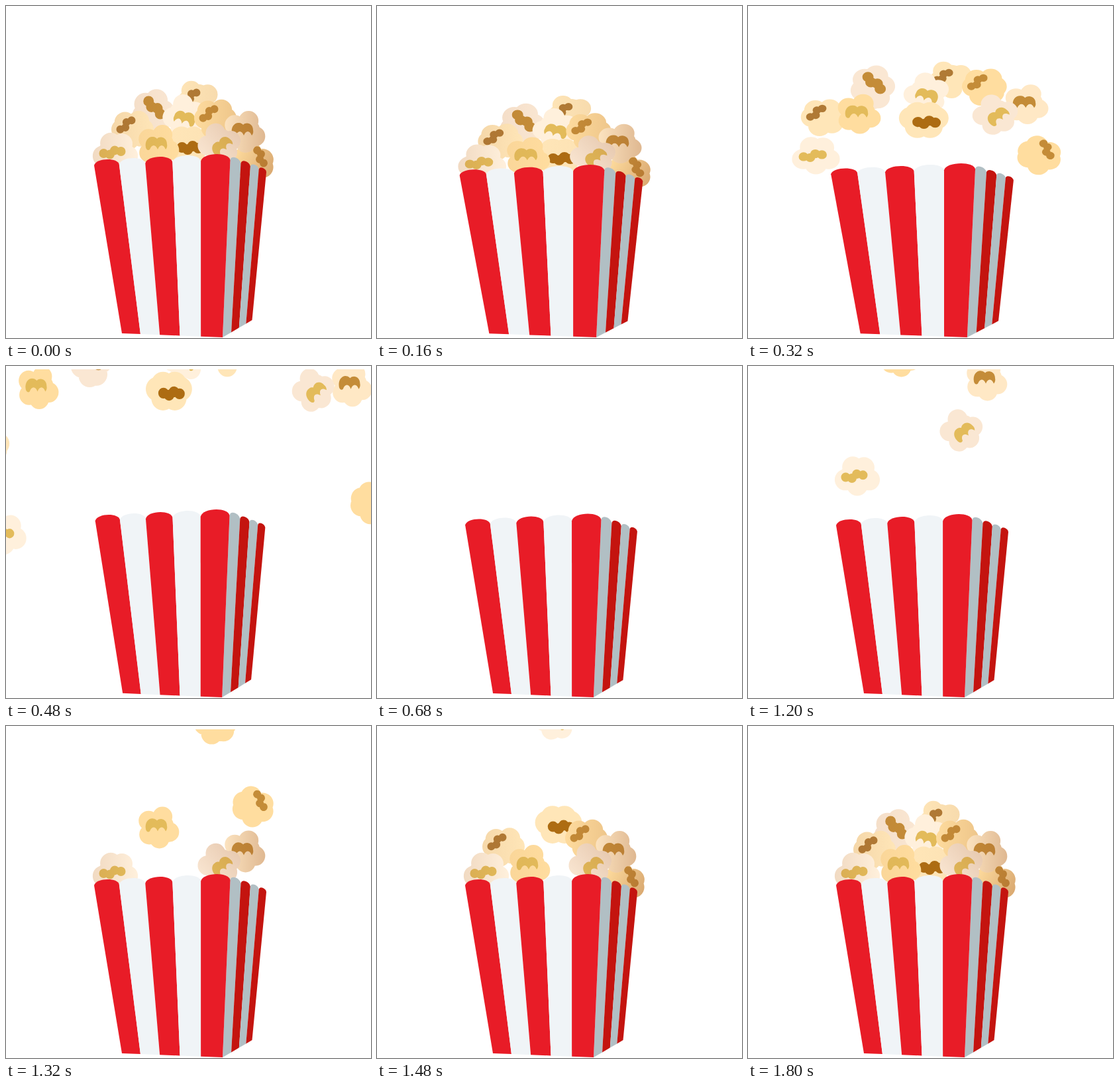
Animation, 551 px wide and 500 px high, one loop 1920 ms. Source, as an HTML page:

```html
<!DOCTYPE html>
<html lang="en">
<head>
<meta charset="utf-8">
<title>Popcorn</title>
<style>
  html, body { margin: 0; width: 100%; height: 100%; overflow: hidden; background: #fff; }
  svg { display: block; width: 100vw; height: 100vh; }
</style>
</head>
<body>
<svg viewBox="0 0 551 500">
  <defs>
    <clipPath id="sky"><rect y="5" width="551" height="495"/></clipPath>
    <linearGradient id="right" gradientUnits="userSpaceOnUse" x1="-30" x2="34">
      <stop offset="0" stop-color="#a0592a" stop-opacity=".1"/>
      <stop offset="1" stop-color="#a0592a"/>
    </linearGradient>
    <linearGradient id="left" gradientUnits="userSpaceOnUse" x1="34" x2="-34">
      <stop offset="0" stop-color="#a0592a" stop-opacity="0"/>
      <stop offset="1" stop-color="#a0592a"/>
    </linearGradient>
  </defs>
  <g clip-path="url(#sky)"><g id="scene"><g id="corn"></g><g id="tub"></g></g></g>
</svg>
<script>
const LOOP = 1920, STEP = 40;
const LAUNCH = 240, FLIGHT = 240, GONE = 680;
const FIRST_LANDING = 1239, BEAT = 40.7, FALL_SPEED = 1.4;
const MIDDLE = 268, HALF_WIDTH = 105;
const scene = document.getElementById('scene');
const corn = document.getElementById('corn');
const tub = document.getElementById('tub');

const lerp = (a, b, u) => a + (b - a) * u;
const smooth = u => u * u * (3 - 2 * u);
const radians = degrees => degrees * Math.PI / 180;

function add(parent, tag, attrs = {}) {
  const node = document.createElementNS('http://www.w3.org/2000/svg', tag);
  for (const key in attrs) node.setAttribute(key, attrs[key]);
  return parent.appendChild(node);
}

const ellipse = (x, y, rx, ry = rx) =>
  `M${x - rx},${y}a${rx},${ry} 0 1 1 ${2 * rx},0a${rx},${ry} 0 1 1 ${-2 * rx},0z`;

// Round lobes set around a core, all touching a w by h outline
const puffy = (w, h, r, ...angles) => ellipse(0, 0, w * .72, h * .72) + angles.map(a =>
  ellipse((w - r) * Math.cos(radians(a)), (h - r) * Math.sin(radians(a)), r)).join('');

// Four beads zigzagging from one point to another
function beads(x0, y0, x1, y1, r) {
  const length = Math.hypot(x1 - x0, y1 - y0);
  return [0, 1, 2, 3].map(i => {
    const side = (i % 2 ? 2 : -2) / length;
    return ellipse(lerp(x0, x1, i / 3) - (y1 - y0) * side, lerp(y0, y1, i / 3) + (x1 - x0) * side, r);
  }).join('');
}

const SHAPES = {
  crown: {
    body: puffy(33, 32, 15, -70, -145, 140, 25, 85),
    spot: 'M-19,3C-21,-8 -14,-14 -8,-13C-5,-13 -3,-11 -2,-10C3,-15 13,-12 13,-2' +
      'C14,2 12,5 11,6C8,-2 2,-2 -1,6C-4,-2 -10,-2 -13,6C-15,8 -18,7 -19,3z'
  },
  curl: { body: puffy(32, 31, 16, -135, -55, 0, 40, 110, 180), spot: beads(-3, -15, -17, 1, 6) },
  bean: { body: puffy(32, 36, 17, -140, -70, -5, 60, 100, 165), spot: beads(-8, -15, 12, 1, 8) },
  cloud: { body: puffy(36, 30, 16, -110, -60, 25, 90, 155), spot: beads(-17, 4, 8, -3, 7) },
  bow: { body: puffy(36, 30, 18, -165, -120, -60, -15, 60, 120), spot: beads(-8, 5, 16, 2, 8) },
  puff: { body: puffy(31, 31, 15, -130, -25, 85, 170), spot: beads(-4, -11, -18, 3, 6) }
};
const GOLD = '#e3bb5a', BROWN = '#b07a35', AMBER = '#c48c38';
const BUTTER = '#ffdd9f', VANILLA = '#ffe6b8', MILK = '#fff0dc', BLUSH = '#fae7d3';

// Back to front; heading is in degrees from straight up, beat is the landing order
const kernels = [
  { shape: 'puff', x: 290, y: 140, fill: VANILLA, spot: BROWN, heading: 17, reach: 149, beat: 13 },
  { shape: 'bean', x: 222, y: 160, fill: BLUSH, spot: AMBER, heading: -32, reach: 179, beat: 11 },
  { shape: 'crown', x: 269, y: 165, fill: MILK, spot: GOLD, heading: 0, reach: 162, beat: 9, flip: true, turn: 15, nudge: [-3, 6] },
  { shape: 'curl', x: 191, y: 186, fill: VANILLA, spot: BROWN, heading: -75, reach: 229, beat: 6 },
  { shape: 'bow', x: 274, y: 210, fill: VANILLA, spot: '#ad6c12', heading: -10, reach: 163, beat: 7 },
  { shape: 'curl', x: 316, y: 169, fill: BUTTER, spot: AMBER, heading: 32, reach: 215, beat: 5 },
  { shape: 'curl', x: 373, y: 236, fill: BUTTER, spot: AMBER, heading: 83, reach: 183, beat: 4, flip: true, turn: 25, nudge: [-1, -7] },
  { shape: 'crown', x: 360, y: 189, fill: '#ffe8c5', spot: AMBER, heading: 48, reach: 222, beat: 2 },
  { shape: 'crown', x: 322, y: 208, fill: BLUSH, spot: GOLD, heading: 42, reach: 216, beat: 1, turn: -40, nudge: [8, 3] },
  { shape: 'crown', x: 230, y: 210, fill: BUTTER, spot: GOLD, heading: -48, reach: 248, beat: 3 },
  { shape: 'cloud', x: 165, y: 220, fill: MILK, spot: GOLD, heading: -103, reach: 176, beat: 0 }
];

for (const k of kernels) {
  const { body, spot } = SHAPES[k.shape];
  const pose = `rotate(${k.turn || 0}) scale(${k.flip ? -1 : 1},1)`;
  const tilt = (k.x - MIDDLE) / HALF_WIDTH;
  const side = (tilt < 0) !== !!k.flip ? 'left' : 'right';
  k.shade = tilt < 0 ? -.15 * tilt : .4 * tilt;
  k.node = add(corn, 'g');
  add(k.node, 'path', { d: body, fill: k.fill, transform: pose });
  add(k.node, 'path', { d: spot, fill: k.spot, transform: `translate(${k.nudge || [0, 0]}) ${pose}` });
  k.veil = add(k.node, 'path', { d: body, fill: `url(#${side})`, transform: pose });
}

// One wall of the tub: corners [x, y]; bulge widens the stripes nearer the viewer
function wall({ top, bottom, count, bulge, arch, colors }) {
  const point = ([from, to], i) => {
    const p = i / count, u = p * (1 + bulge * (1 - p));
    return [lerp(from[0], to[0], u), lerp(from[1], to[1], u)];
  };
  for (let i = 0; i < count; i++) {
    const [ax, ay] = point(top, i), [bx, by] = point(top, i + 1);
    const w = bx - ax, rise = w * arch * 4 / 3;
    add(tub, 'path', {
      fill: colors[i % 2],
      d: `M${point(bottom, i)}L${ax},${ay}C${ax + w * .06},${ay - rise} ` +
        `${bx - w * .06},${by - rise} ${bx},${by}L${point(bottom, i + 1)}z`
    });
  }
}
wall({
  top: [[338.5, 232], [393, 250]], bottom: [[327, 499], [371.5, 473]],
  count: 4, bulge: .23, arch: .4, colors: ['#b1bfc4', '#c4140f']
});
wall({
  top: [[133, 240], [338.5, 232]], bottom: [[175, 493], [327, 499]],
  count: 5, bulge: -.1, arch: .22, colors: ['#e81c27', '#f0f4f7']
});

// Crouch, spring up, settle: [time, scale x, scale y]
function squash(t) {
  const keys = [[0, 1, 1], [240, 1.086, .922], [480, .987, 1.026], [720, 1, 1]];
  const i = keys.findIndex(key => key[0] > t);
  if (i < 0) return [1, 1];
  const [a, b] = [keys[i - 1], keys[i]];
  const u = smooth((t - a[0]) / (b[0] - a[0]));
  return [lerp(a[1], b[1], u), lerp(a[2], b[2], u)];
}

function offset(k, t) {
  if (t <= LAUNCH) return [0, 0];
  if (t < GONE) {
    const u = (t - LAUNCH) / FLIGHT, angle = radians(k.heading);
    const lift = Math.abs(k.heading) * u * (1 - u);
    return [Math.sin(angle) * k.reach * u * (.9 + .1 * u), -Math.cos(angle) * k.reach * u - lift];
  }
  const landing = FIRST_LANDING + BEAT * k.beat;
  return [0, Math.min(0, (t - landing) * FALL_SPEED)];
}

function draw(time) {
  let t = Math.floor(time % LOOP / STEP) * STEP;
  if (t > 960 && t < 1080) t = 960;
  scene.setAttribute('transform', `translate(263,498) scale(${squash(t)}) translate(-263,-498)`);
  for (const k of kernels) {
    const [dx, dy] = offset(k, t);
    k.node.setAttribute('transform', `translate(${k.x + dx},${k.y + dy})`);
    k.veil.setAttribute('opacity', k.shade * Math.max(0, 1 - Math.hypot(dx, dy) / 40));
  }
}

const start = performance.now();
function tick() {
  draw(performance.now() - start);
  requestAnimationFrame(tick);
}
tick();
</script>
</body>
</html>
```
